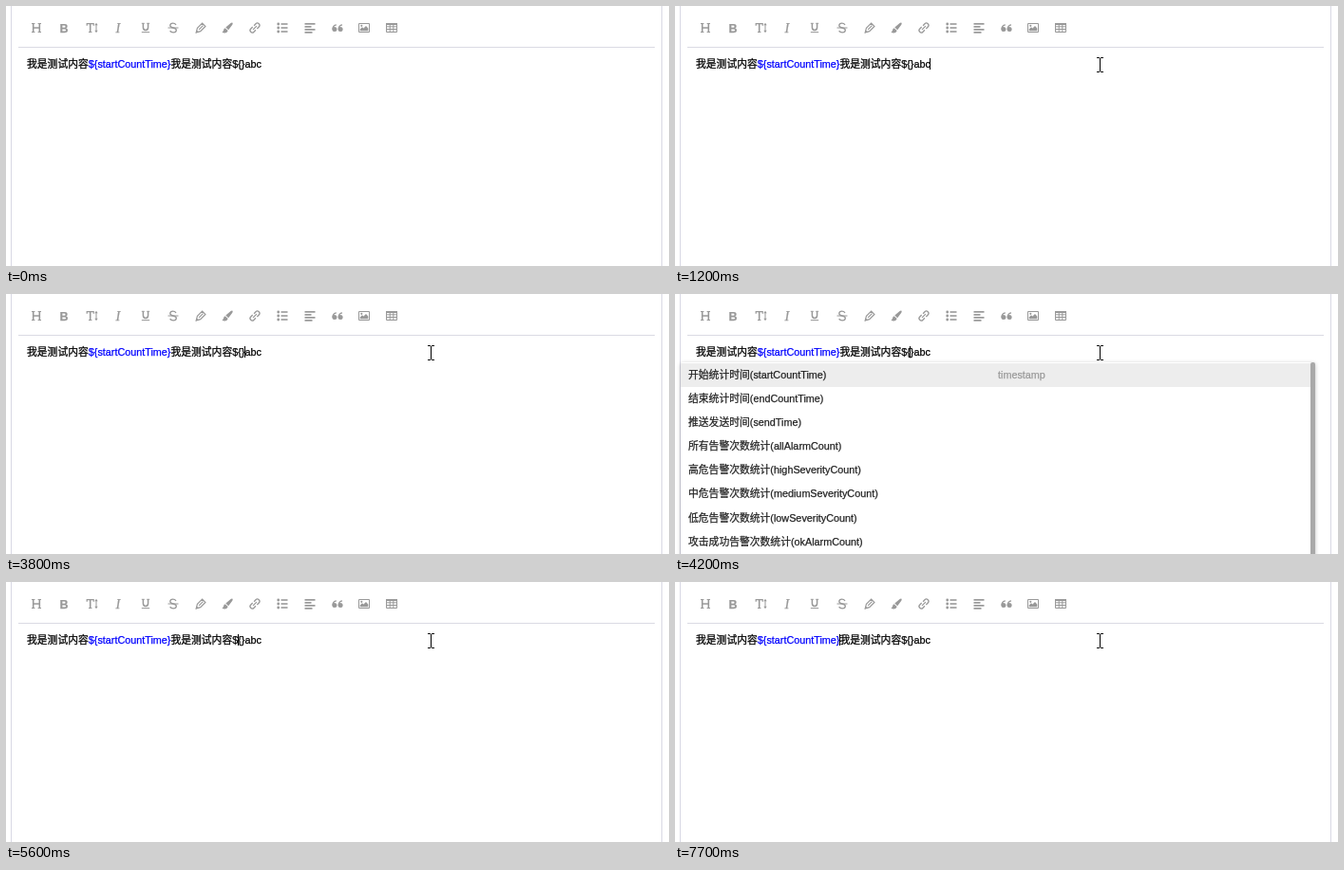
An HTML page with a canvas that plays this animation: 698 by 274 pixels, repeating every 8 s.

```html
<!DOCTYPE html>
<html lang="zh-CN">
<head>
<meta charset="utf-8">
<title>Editor</title>
<style>
html, body { margin: 0; width: 100%; height: 100%; overflow: hidden; background: #fff; }
canvas { display: block; width: 698px; height: 274px; }
</style>
</head>
<body>
<canvas id="stage" width="698" height="274"></canvas>
<script>
const c = document.getElementById('stage').getContext('2d');
const LOOP = 8000;
const SIZE = 10.8;
const FONT = `${SIZE}px "Liberation Sans", Arial, "Noto Sans CJK SC", "Noto Sans CJK", sans-serif`;
const SERIF = '"Liberation Serif", "Noto Serif", serif';
const ICON = '#999';

const options = [
  '开始统计时间(startCountTime)',
  '结束统计时间(endCountTime)',
  '推送发送时间(sendTime)',
  '所有告警次数统计(allAlarmCount)',
  '高危告警次数统计(highSeverityCount)',
  '中危告警次数统计(mediumSeverityCount)',
  '低危告警次数统计(lowSeverityCount)',
  '攻击成功告警次数统计(okAlarmCount)'
];

// [time, x, colour]; a missing x hides the caret
const carets = [
  [0], [1200, 268], [1700], [2200, 268], [2700], [2900, 263], [3400, 257],
  [3800, 251], [4200, 247], [4700], [5200, 247], [5600, 244], [6000, 238],
  [6300, 227], [6500, 216], [6700, 205], [6900, 194], [7100, 184],
  [7400, 173, '#00f'], [7700, 173]
];

function rect(x, y, w, h, color) {
  c.fillStyle = color;
  c.fillRect(x, y, w, h);
}

// A hairline outline gives the slightly heavy look of hinted screen text
function text(str, x, y, color, font = FONT) {
  c.font = font;
  c.fillStyle = c.strokeStyle = color;
  c.lineWidth = .25;
  c.fillText(str, x, y);
  c.strokeText(str, x, y);
}

function stroke(d, width = 1.3) {
  c.lineWidth = width;
  c.stroke(new Path2D(d));
}

function fill(d) {
  c.fill(new Path2D(d));
}

function dot(x, y, r) {
  c.beginPath();
  c.arc(x, y, r, 0, 7);
  c.fill();
}

function glyph(str, font) {
  c.textAlign = 'center';
  text(str, 0, 4.7, ICON, font);
  c.textAlign = 'left';
}

// Toolbar icons, each drawn around its own centre
const icons = [
  () => {
    stroke('M-3.3 -4.5V4.5M3.3 -4.5V4.5M-3.3 0H3.3', 1.6);
    stroke('M-5 -4.5H-1.6M1.6 -4.5H5M-5 4.5H-1.6M1.6 4.5H5', 1);
  },
  () => glyph('B', 'bold 12.5px "Liberation Sans", Arial, sans-serif'),
  () => {
    stroke('M-4.8 -2.2V-4.4H2.2V-2.2', 1.2);
    stroke('M-1.3 -4.4V4.5', 1.6);
    stroke('M-3 4.5H.4M5 -4V4', 1);
    fill('M5 -5.3L6.7 -2.8H3.3ZM5 5.3L6.7 2.8H3.3Z');
  },
  () => glyph('I', `italic 14.5px ${SERIF}`),
  () => {
    stroke('M-2.6 -4.7V-.5Q-2.6 2.4 0 2.4T2.6 -.5V-4.7', 1.5);
    stroke('M-4.2 -4.7H-1.2M1.2 -4.7H4.2M-4.2 4.6H4.2', 1);
  },
  () => {
    stroke('M3 -3Q2 -4.8 -.3 -4.8Q-3.2 -4.8 -3.2 -2.5Q-3.2 -.7 0 0Q3.3 .8 3.3 2.5Q3.3 4.8 .2 4.8Q-2.5 4.8 -3.3 3', 1.3);
    stroke('M-5.5 0H5.5', 1);
  },
  () => {
    stroke('M-4.7 4.8L-3.6 .4L1.6 -4.8L4.9 -1.6L-.3 3.6ZM-1.8 1.8L2.4 -2.4', 1.2);
    fill('M-5.4 5.4L-4.5 2.2L-2.2 4.5Z');
  },
  () => {
    fill('M5.3 -5.4Q6.2 -4.7 5.3 -3.2L1.2 2.2L-1.7 -.4L3.6 -5Q4.7 -5.9 5.3 -5.4Z');
    fill('M-2.3 .3L.7 3Q0 5.3 -2.5 5.4Q-4.5 5.4 -5.5 4.4Q-4 3.7 -3.9 2.2Q-3.7 .6 -2.3 .3Z');
  },
  () => {
    c.save();
    c.rotate(-Math.PI / 4);
    stroke('M-1 -2.3H-4Q-6 -2.3 -6 0T-4 2.3H-1M1 -2.3H4Q6 -2.3 6 0T4 2.3H1M-2.7 0H2.7', 1.3);
    c.restore();
  },
  () => [-4, 0, 4].forEach(y => {
    dot(-4.3, y, 1.4);
    c.fillRect(-1.5, y - .8, 7, 1.6);
  }),
  () => [11, 7, 11, 8].forEach((w, i) => c.fillRect(-5.5, -5 + i * 3, w, 1.7)),
  () => [-5.6, .6].forEach(x => {
    dot(x + 2.5, 1.5, 2.5);
    stroke(`M${x + .6} 1.5Q${x + .5} -2.7 ${x + 4.4} -3.2`, 1.3);
  }),
  () => {
    stroke('M-5.5 -4.5H5.5V4.5H-5.5Z', 1);
    fill('M-4.3 3.3V1.5L-2 -.8L-.6 .6L2 -2L4.3 .5V3.3Z');
    dot(-2.7, -2.2, 1.1);
  },
  () => {
    stroke('M-5.5 -4.5H5.5V4.5H-5.5ZM-5.5 1.5H5.5M-1.8 -4V4.5M1.8 -4V4.5M-5.5 -1.2H5.5', 1);
    c.fillRect(-6, -5, 12, 2);
  }
];

function drawToolbar() {
  icons.forEach((draw, i) => {
    c.save();
    c.translate(32 + Math.round(i * 28.78), 23);
    c.fillStyle = c.strokeStyle = ICON;
    draw();
    c.restore();
  });
  rect(13, 43, 670, 1, '#dadae3');
}

function drawContent() {
  const parts = [['我是测试内容', '#000'], ['${startCountTime}', '#00f'], ['我是测试内容${}abc', '#000']];
  let x = 22;
  for (const [str, color] of parts) {
    text(str, x, 65, color);
    x += c.measureText(str).width;
  }
}

function drawMenu() {
  c.save();
  c.shadowColor = 'rgba(0,0,0,.25)';
  c.shadowBlur = 4;
  c.shadowOffsetY = 1;
  c.fillStyle = '#fff';
  c.beginPath();
  c.roundRect(6, 72, 668, 220, 2);
  c.fill();
  c.restore();
  rect(6, 73, 663, 25, '#ededed');
  c.fillStyle = '#a9a9a9';
  c.beginPath();
  c.roundRect(669, 72, 5, 220, 2);
  c.fill();
  options.forEach((str, i) => text(str, 14, 89 + Math.floor(i * 25.17), '#222'));
  text('timestamp', 340, 89, '#999');
}

function drawCaret(t) {
  const [, x, color = '#000'] = carets.filter(k => k[0] <= t).pop();
  if (x) rect(x, 55, 1, 12, color);
}

function drawPointer(t) {
  if (t < 200) return;
  const step = Math.floor(t / 100) * 100;
  const left = Math.max(0, 1 - (step - 200) / 800) ** 1.52;
  let x = Math.round(452 + 212 * left);
  const y = Math.round(62 - 14 * left ** 1.5);
  if (step >= 1100) x = step < 1200 ? 449 : 447;
  rect(x - 1, y - 7, 3, 14, '#fff');
  rect(x, y - 7, 1, 14, '#000');
  for (const edge of [y - 8, y + 7]) {
    rect(x - 3, edge, 3, 1, '#000');
    rect(x + 1, edge, 3, 1, '#000');
  }
}

function draw(t) {
  rect(0, 0, 698, 274, '#fff');
  rect(5, 0, 1, 274, '#d8d8e4');
  rect(690, 0, 1, 274, '#d8d8e4');
  drawToolbar();
  drawContent();
  if (t >= 4200 && t < 5600) drawMenu();
  drawCaret(t);
  drawPointer(t);
}

let start;
function tick(now) {
  start ??= now;
  draw((now - start) % LOOP);
  requestAnimationFrame(tick);
}
requestAnimationFrame(tick);
</script>
</body>
</html>
```
